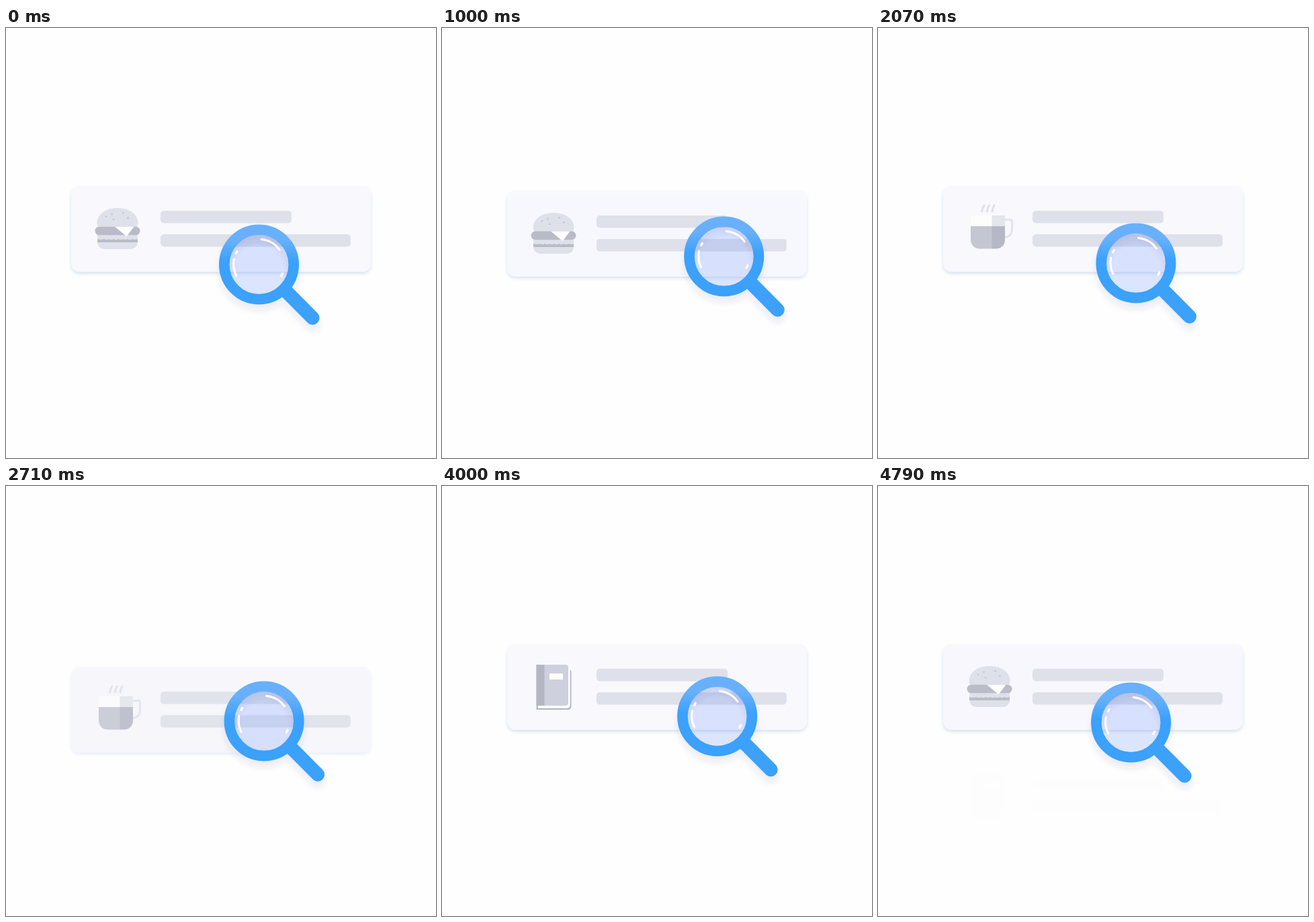
Write an HTML page that moves like this. It is 640x640 px and loops after 4870 ms.

```html
<!DOCTYPE html>
<html lang="en">
<head>
<meta charset="utf-8">
<title>Search list</title>
<style>
  html, body { margin: 0; width: 100%; height: 100%; overflow: hidden; background: #fefefe; }
  svg { display: block; width: 100vw; height: 100vh; }
  .light { fill: #dfe1ea; }
  .dark { fill: #b9bbc7; }
  .white { fill: #fff; }
  .stroke { fill: none; stroke-linecap: round; stroke-linejoin: round; }
</style>
</head>
<body>
<svg viewBox="0 0 640 640" xmlns="http://www.w3.org/2000/svg">
  <defs>
    <filter id="soft" x="-10%" y="-20%" width="120%" height="140%"><feGaussianBlur stdDeviation="2.6"/></filter>
    <filter id="drop" filterUnits="userSpaceOnUse" x="-90" y="-90" width="210" height="220">
      <feDropShadow dx="0" dy="9" stdDeviation="4.5" flood-color="#2c3f7c" flood-opacity=".09"/>
    </filter>
    <linearGradient id="ring" gradientUnits="userSpaceOnUse" x1="0" y1="-60" x2="0" y2="60">
      <stop offset=".2" stop-color="#67b0fc"/>
      <stop offset=".46" stop-color="#3ba1fa"/>
    </linearGradient>
    <clipPath id="mug"><path d="M138 279H189V315.500a13 13 0 0 1-13 13H151a13 13 0 0 1-13-13Z"/></clipPath>

    <g id="burger">
      <path class="light" d="M139 297Q135.500 295 135.500 290C136 277 148 268 166 268S196 277 196.500 290Q196.500 295 193 297Z"/>
      <g fill="#c3c5d0">
        <circle cx="149" cy="280.500" r="1.200"/><circle cx="157.500" cy="277" r="1.400"/>
        <circle cx="174.500" cy="275.500" r="1.400"/><circle cx="181.500" cy="282.500" r="1.400"/>
        <circle cx="160" cy="285" r="1.300"/>
      </g>
      <path class="dark" d="M136 309H196V319.500H136Z"/>
      <path class="light" d="M136 308H196V314q-4 2-8 0q-3 2.500-7 0q-3 2.500-7 0q-3 2.500-7 0q-3 2.500-7 0q-3 2.500-7 0q-3 2.500-7 0q-5 2-10 0Z"/>
      <path class="light" d="M136 319H196a10 10 0 0 1-10 10H146a10 10 0 0 1-10-10Z"/>
      <rect class="dark" x="132.500" y="295.700" width="67" height="12.600" rx="6.300"/>
      <path class="white" d="M162 295.700H190.500L180.500 309Q179.500 310 178 309Z"/>
    </g>

    <g id="cup">
      <path class="stroke" stroke="#e2e4eb" stroke-width="3"
            d="M189 285.500H197.500Q199.500 285.500 199.500 287.500V299Q199.500 310 189 311.500"/>
      <path class="stroke" stroke="#dfe1ea" stroke-width="3"
            d="M154.500 273q.5-5 3.500-9M162.300 273q.5-5 3.300-9M170 273q.5-5 3-9"/>
      <g clip-path="url(#mug)">
        <path fill="#fdfdfe" d="M138 279h32v17h-32z"/>
        <path fill="#e4e6ec" d="M169.500 279h20v17h-20z"/>
        <path fill="#c4c6d1" d="M138 295h32v34h-32z"/>
        <path fill="#b6b8c5" d="M169.500 295h20v34h-20z"/>
      </g>
    </g>

    <g id="book">
      <path fill="#b5b6c4" d="M140.500 266H152V273H188Q192.500 273 192.500 277V327Q192.500 333 186.500 333H140.500Z"/>
      <path class="white" d="M143 327H152V271H190.700V326Q190.700 330.800 186 330.800H143Q142 329 143 327Z"/>
      <path fill="#cfd0dd" d="M152 266H183.500Q188 266 188 270.500V322.500Q188 327 183.500 327H152Z"/>
      <path fill="#b5b6c4" d="M140.500 266H152.500V327H140.500Z"/>
      <path class="white" d="M160 279h20v9h-20z"/>
    </g>
  </defs>

  <g id="cards"></g>

  <g id="lens">
    <circle r="45" fill="#5682ff" fill-opacity=".2"/>
    <g filter="url(#drop)">
      <path class="stroke" stroke="#3ba1fa" stroke-width="20.500" d="M42 41.500L79.800 79.500"/>
      <circle class="stroke" r="51.700" stroke="url(#ring)" stroke-width="15.600"/>
    </g>
    <path class="stroke" stroke="#fff" stroke-width="3"
          d="M3.500 -37.500A37.700 37.700 0 0 1 30.500 -22M-34 16A37.700 37.700 0 0 1 -37.200 -8"/>
    <path class="stroke" stroke="#fff" stroke-width="3.300" d="M-34 -16.500L-32.500 -19.500M35 13.500L33.200 17"/>
  </g>
</svg>
<script>
const LOOP = 4870, FPS = 14;
const GAP = 162, SLIDE = 680;
const STARTS = [910, 2508, 4105];
const ICONS = ['burger', 'cup', 'book'];
const SWING = { period: 2410, lead: 10, out: 1170, dx: 45.3, dy: -12.6 };

const $ = id => document.getElementById(id);
const clamp = v => Math.max(0, Math.min(1, v));
const ease = v => (1 - Math.cos(Math.PI * clamp(v))) / 2;

$('cards').innerHTML = ICONS.map(icon => `
  <g>
    <rect x="97" y="238.500" width="446" height="127" rx="12" fill="#d7e1ee" filter="url(#soft)"/>
    <rect x="97" y="235" width="446" height="128" rx="12" fill="#f8f8fd"/>
    <g>
      <use href="#${icon}"/>
      <rect class="light" x="230" y="272" width="195" height="18.500" rx="5"/>
      <rect class="light" x="230" y="307" width="283" height="18.500" rx="5"/>
    </g>
  </g>`).join('');
const cards = [...$('cards').children];

function drawCard(card, enter, leave) {
  const y = (ease(enter) - 1 + ease(leave)) * GAP;
  const rise = clamp((enter - .33) / .8);
  const shown = 1 - (1 - rise) ** 2;
  const kept = 1 - ease(leave - .05);
  const alpha = shown * kept;
  const [shadow, panel, content] = card.children;
  card.setAttribute('transform', `translate(0 ${y.toFixed(2)})`);
  card.setAttribute('visibility', alpha > .004 ? 'visible' : 'hidden');
  shadow.setAttribute('opacity', clamp(rise * 2) * kept ** 4);
  panel.setAttribute('opacity', alpha);
  content.setAttribute('opacity', alpha);
}

function drawLens(t) {
  const s = (t + SWING.lead) % SWING.period;
  const k = s < SWING.out
    ? ease(s / SWING.out)
    : ease((SWING.period - s) / (SWING.period - SWING.out));
  const x = 376.5 + SWING.dx * k, y = 352 + SWING.dy * k;
  $('lens').setAttribute('transform', `translate(${x.toFixed(2)} ${y.toFixed(2)})`);
}

function draw(ms) {
  // The motion steps at a fixed frame rate.
  const t = Math.floor((ms % LOOP + 5) * FPS / 1000) * 1000 / FPS;
  const phase = i => (t - STARTS[i]) / SLIDE;
  const wrapping = t >= STARTS[2];
  cards.forEach((card, i) => {
    if (i) drawCard(card, phase(i - 1), phase(i));
    else drawCard(card, wrapping ? phase(2) : 9, wrapping ? 0 : phase(0));
  });
  drawLens(t);
}

const begin = performance.now();
function tick() {
  draw(performance.now() - begin);
  requestAnimationFrame(tick);
}
tick();
</script>
</body>
</html>
```
